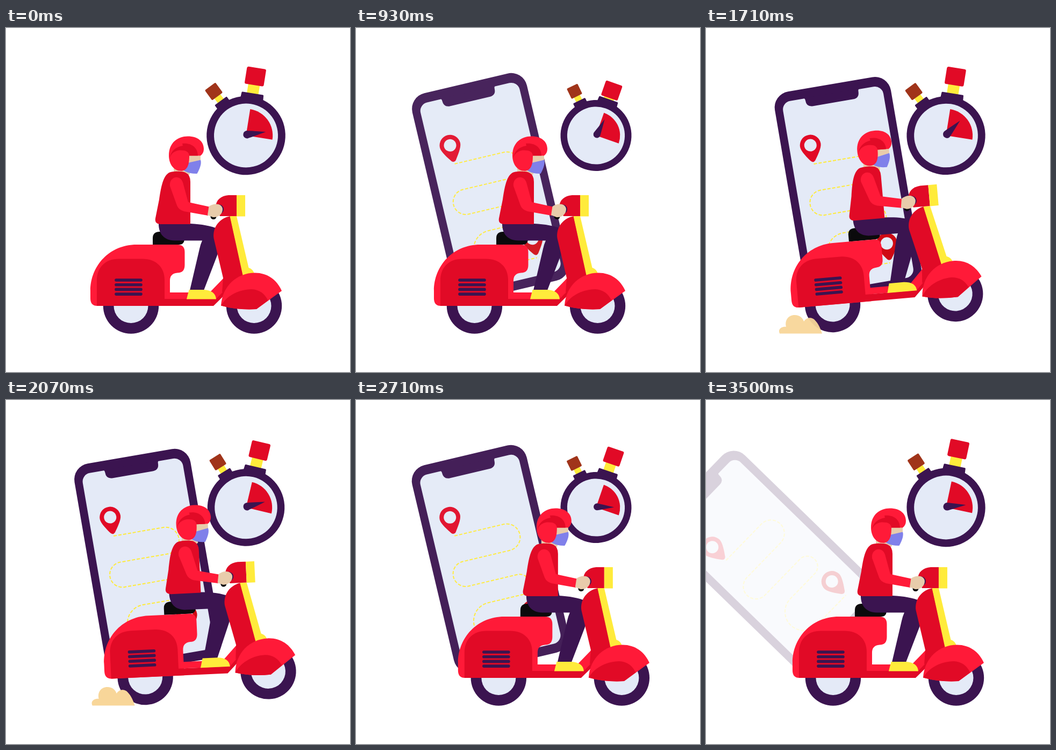
Recreate the animation shown at these times as an HTML page with a canvas. Size 640 px wide and 640 px high, loop 3.57 s.

```html
<!DOCTYPE html>
<html lang="en">
<head>
<meta charset="utf-8">
<title>Scooter delivery</title>
<style>
  html, body { margin: 0; width: 100%; height: 100%; overflow: hidden; background: #fff; }
  canvas { display: block; width: 640px; height: 640px; }
</style>
</head>
<body>
<canvas id="stage"></canvas>
<script>
const LOOP = 3570;
const RED = '#e10a26', BRIGHT = '#ff1a38', PURPLE = '#3b1450', PALE = '#e4eaf7',
      YELLOW = '#ffeb3b', SKIN = '#e8ccab', BROWN = '#a0341a', SAND = '#f8d699';

const dpr = Math.max(1, window.devicePixelRatio || 1);
const canvas = document.getElementById('stage');
const layer = document.createElement('canvas');
for (const c of [canvas, layer]) c.width = c.height = 640 * dpr;
const main = canvas.getContext('2d');
const sub = layer.getContext('2d');
let ctx = main;

const rad = deg => deg * Math.PI / 180;

// Monotone cubic through [time, value] keys.
function track(keys) {
  const slope = i => (keys[i + 1][1] - keys[i][1]) / (keys[i + 1][0] - keys[i][0]);
  const tangent = i => {
    if (i === 0) return slope(0);
    if (i === keys.length - 1) return slope(i - 1);
    const a = slope(i - 1), b = slope(i);
    return a * b <= 0 ? 0 : 2 * a * b / (a + b);
  };
  return t => {
    let i = 0;
    while (i < keys.length - 2 && t > keys[i + 1][0]) i++;
    const [t0, v0] = keys[i], [t1, v1] = keys[i + 1];
    const d = t1 - t0, u = Math.min(1, Math.max(0, (t - t0) / d));
    const w = u * u * (3 - 2 * u), n = 1 - u;
    return v0 + (v1 - v0) * w + d * u * n * (tangent(i) * n - tangent(i + 1) * u);
  };
}

const rideX = track([[0, 0], [430, -6], [930, -12], [1250, -16], [1710, 3],
  [2290, 37], [2360, 38], [2900, 28], [3000, 24], [3500, 4], [3570, 0]]);
const rideY = track([[0, 0], [1200, 0], [1710, -2.5], [2360, -0.3], [2480, 0], [3570, 0]]);
const tilt = track([[0, 0], [1200, 0], [1710, -5], [2360, -0.35], [2480, 0], [3570, 0]]);
const dustAlpha = track([[0, 0], [1200, 0], [1420, 0.9], [1710, 0.95], [2000, 1],
  [2400, 1], [2650, 0], [3570, 0]]);
const clockTurn = track([[0, 9], [430, 18.5], [930, 19.3], [1250, 19], [1710, 9],
  [1790, 9], [2360, 18.3], [3000, 19.1], [3200, 18.6], [3500, 12], [3570, 9]]);
const press = track([[0, 0], [740, 0], [930, 12.8], [1120, 0], [3570, 0]]);
const handTurn = track([[0, 73], [70, 72], [380, 8.5], [1000, 8], [1710, 35],
  [2300, 72], [3570, 73]]);
const pinSwing = track([[0, -50], [430, -26], [850, 0], [3570, 0]]);

function fill(color, shape, rule) {
  ctx.fillStyle = color;
  ctx.fill(typeof shape === 'string' ? new Path2D(shape) : shape, rule || 'nonzero');
}

function disc(color, x, y, r) {
  const p = new Path2D();
  p.arc(x, y, r, 0, 7);
  fill(color, p);
}

function box(color, x, y, w, h, r) {
  const p = new Path2D();
  p.roundRect(x, y, w, h, r);
  fill(color, p);
}

function within(x, y, deg, draw) {
  ctx.save();
  ctx.translate(x, y);
  ctx.rotate(rad(deg));
  draw();
  ctx.restore();
}

// Tip at the origin, head above it.
function pin(x, y, deg, color) {
  within(x, y, deg, () => {
    fill(color, 'M-19.5 -31.5A19.5 19.5 0 1 1 19.5 -31.5C19.5 -23 9 -9 4 -2Q0 2 -4 -2C-9 -9 -19.5 -23 -19.5 -31.5Z');
    disc(PALE, 0, -31.5, 11.5);
  });
}

const route = new Path2D('M58 -267H152A25 25 0 0 1 152 -217H62A23.5 23.5 0 0 0 62 -170' +
  'H156.5A19.3 19.3 0 0 1 156.5 -131.5H90A34.7 34.7 0 0 0 90 -62H167');

function phone(t) {
  const x = (t - 1850) / 1000, d = Math.abs(x);
  const alpha = Math.max(0, 1 - Math.pow(d / 1.735, 4.2));
  if (!alpha) return;
  const [q, r] = x < 0 ? [0.2, 4.8] : [1.8, 4.2];
  const angle = -(9.7 + q * d ** 2 + r * d ** 4);

  sub.setTransform(dpr, 0, 0, dpr, 0, 0);
  sub.clearRect(0, 0, 640, 640);
  ctx = sub;
  within(188.4, 526, angle, () => {
    box(PURPLE, 3.5, -408, 219, 396, 30);
    box(PALE, 18.3, -390, 189.4, 361, 16);
    fill(PURPLE, 'M60 -391H165Q162.5 -390 162.5 -386Q162.5 -373.5 150 -373.5H75Q62.5 -373.5 62.5 -386Q62.5 -390 60 -391Z');
    ctx.strokeStyle = YELLOW;
    ctx.lineWidth = 2;
    ctx.setLineDash([6, 3]);
    ctx.stroke(route);
    pin(57.7, -271, pinSwing(t), RED);
    pin(167, -67, 0, '#cf0914');
  });
  ctx = main;
  ctx.globalAlpha = alpha;
  ctx.drawImage(layer, 0, 0, 640, 640);
  ctx.globalAlpha = 1;
}

function clock(t) {
  const r = 69.65 + 3.65 * Math.cos((t - 15) / LOOP * 4 * Math.PI);
  within(446.5, 200, clockTurn(t), () => {
    ctx.scale(r / 73.3, r / 73.3);
    const push = press(t);
    box(YELLOW, -10.8, -98 + push, 21.6, 30, 0);
    box(RED, -18, -127.5 + push, 36, 32.5, 3);
    fill(PURPLE, 'M-19 -79.5H19Q20.5 -79.5 20.6 -78L21.5 -66H-21.5L-20.6 -78Q-20.5 -79.5 -19 -79.5Z');
    within(0, 0, -45.2, () => {
      box(YELLOW, -6.8, -93, 13.6, 20, 0);
      box(BROWN, -12.3, -113.2, 24.6, 23.2, 2);
      box(PURPLE, -13.8, -80, 27.6, 14, 1.5);
    });
    disc(PURPLE, 0, 0, 73.3);
    disc(PALE, 0, 0, 59.5);
    fill(RED, 'M0 0V-49.7A49.7 49.7 0 0 1 49.7 0Z');
    within(0.8, -1.8, handTurn(t), () => {
      fill(PURPLE, 'M-7.3 -1A7.3 7.3 0 1 0 7.3 -1Q6.6 -6 0 -36Q-6.6 -6 -7.3 -1Z');
    });
  });
}

function wheel(x) {
  disc(PURPLE, x, 517, 51.7);
  disc(PALE, x, 517, 32);
}

function scooter() {
  wheel(232.5);
  wheel(461.5);

  // seat
  fill('#0b0a0c', 'M273 403V391Q273 379 286 379H332V394Q331 403 322 403Z');

  // body and floor
  fill(BRIGHT, 'M157 489C157 442 193 403 243 403H319Q332.5 403 332.5 417V441Q332.5 455.5 319 455.5Q305 456.5 305 470V517H170Q157 517 157 503Z');
  fill(BRIGHT, 'M300 492H379L408 462L430 470L392 504H300Z');
  fill(RED, 'M169 517V470C169 445 185 429.5 210 429.5H254C279 429.5 295 445 295 468V504H391L432 462L441 463L386 517Z');
  ctx.strokeStyle = PURPLE;
  ctx.lineWidth = 5.6;
  ctx.lineCap = 'round';
  ctx.beginPath();
  for (let i = 0; i < 4; i++) {
    ctx.moveTo(205, 469 + 8.7 * i);
    ctx.lineTo(251, 469 + 8.7 * i);
  }
  ctx.stroke();

  // leg and shoe
  fill(PURPLE, 'M284 364H343C365 365 380 368 396 374V415L368 488H342L360 411Q362 402 365 395.5H314C293 395 284 382 284 364Z');
  fill(YELLOW, 'M340.5 487H368C382 488 390 493 391 504.5H336Z');

  // front column
  fill(RED, 'M417 350C397 354 384 371 386.5 391L404 465L402 492L442 463Z');
  fill(YELLOW, 'M416.5 350H429L451.5 446Q460 449 462 457L441 462Z');

  // front fender
  fill(BRIGHT, 'M400 516.5C402 480 430 455.5 463 455.5C487 455.5 504 469 513 489L466 523Q430 525 400 516.5Z');
  fill(RED, 'M400 516.5C409 500 432 486 457 486Q478 487 487.5 507L466 523Q430 525 400 516.5Z');

  // handlebar
  fill(RED, 'M429 311H414C400 312 391 320 390 332L398 350H429Z');
  box(YELLOW, 429, 311, 16, 39.5, 0);
  disc('#0b0a0c', 386, 350.5, 5.5);
  fill(PURPLE, 'M396 328Q405 330 405 337Q405 343 400 345Z');
}

function rider() {
  fill(SKIN, 'M312 255H342V272Q336 277 325 274L312 268Z');
  fill(RED, 'M302 270C307 266 328 266 334 269Q343 273 343 286V365H287Q276 364 278 354L285 319C288 300 291 278 302 270Z');
  fill(BRIGHT, 'M305 294C303 276 325 271 329.5 289L339 324L378 332.5L376 349L331 341Q321 338 318 330Z');
  fill(SKIN, 'M377.5 332C387 325 402 326 403 337C403 347 394 353 385 352L375 348Z');

  // head
  fill(SKIN, 'M336 234H362V250L338 260Z');
  fill('#8080ea', 'M329 264L338 251L362 245.5Q365 254 355.5 271Q343 271.5 334 267Z');
  fill(BRIGHT, 'M303 237C303 213 320 201.5 338 201.5C358 201.5 368 212 368 225Q368 233 362 237.5H341C341 252 339 265 326 266C312 266 303 253 303 237Z');
  fill(RED, 'M304.5 243C306 229 316 221 329 219L328 215C344 213 357 222 357 237.5H341C340 230 335 227 322 227.5C312 229 306 235 304.5 243Z');
}

function dust() {
  fill(SAND, 'M134 568.5C130 560 138 555 146 556C143 544 150 534 162 534C171 534 177 539 179 546C184 538 194 537 200 544C206 550 210 559 213 568.5Z');
}

function frame(now) {
  const t = now % LOOP;
  ctx.setTransform(dpr, 0, 0, dpr, 0, 0);
  ctx.fillStyle = '#fff';
  ctx.fillRect(0, 0, 640, 640);
  phone(t);
  clock(t);
  const x = rideX(t);
  within(232.5 + x, 517 + rideY(t), tilt(t), () => {
    ctx.translate(-232.5, -517);
    scooter();
    rider();
  });
  ctx.save();
  ctx.globalAlpha = dustAlpha(t);
  ctx.translate(x, 0);
  dust();
  ctx.restore();
}

const start = performance.now();
function loop() {
  frame(performance.now() - start);
  requestAnimationFrame(loop);
}
loop();
</script>
</body>
</html>
```
